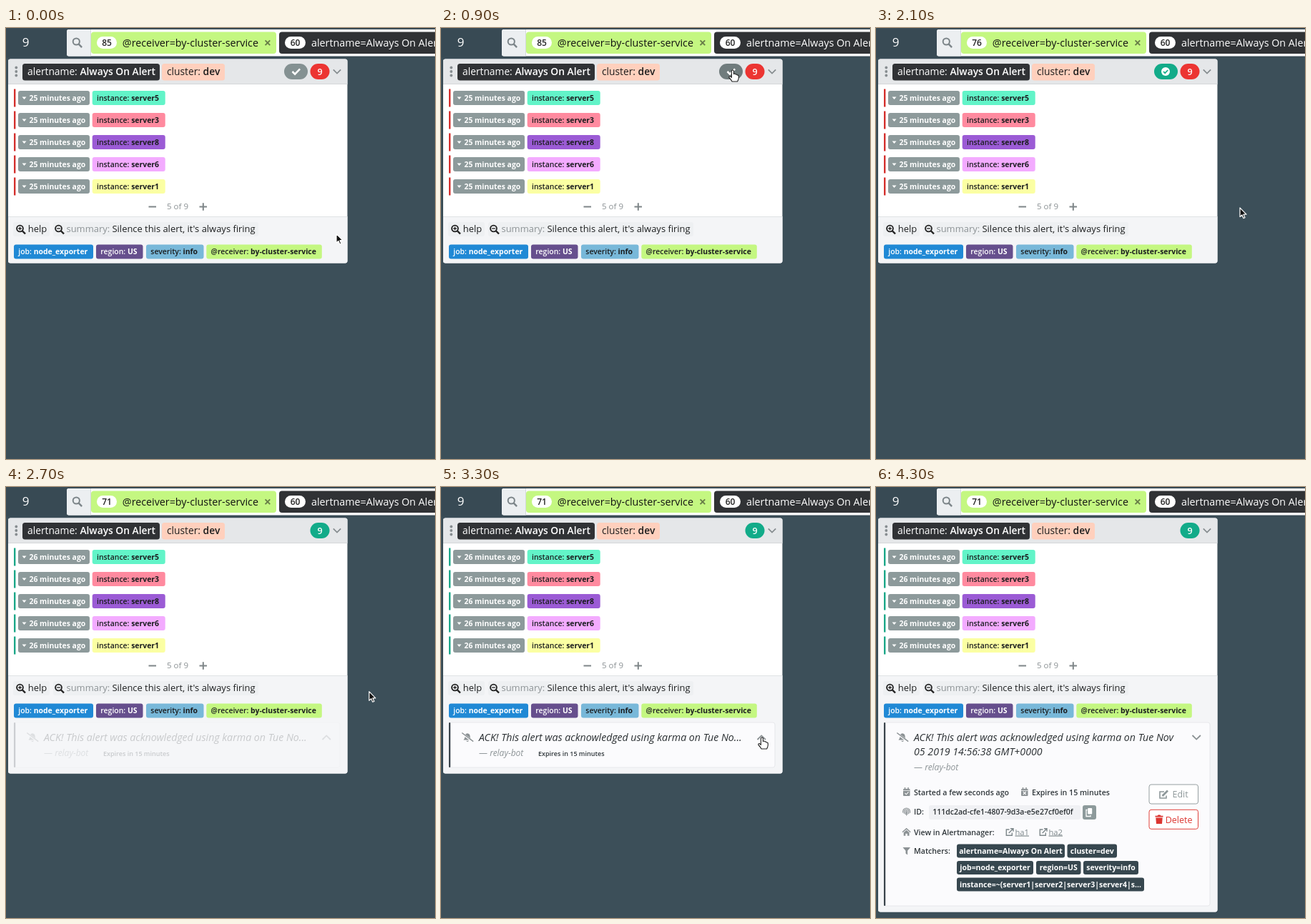
Animation, 600 px wide and 604 px high, one loop 4.4 s. Source, as an HTML page:

```html
<!DOCTYPE html>
<html lang="en">
<head>
<meta charset="utf-8">
<title>Alert acknowledgement</title>
<style>
html, body { margin: 0; width: 100%; height: 100%; overflow: hidden; background: #3c4f59; }
svg { display: block; font-family: "Open Sans", "Noto Sans", sans-serif; }
</style>
</head>
<body>
<svg id="stage" width="600" height="604" viewBox="0 0 600 604"></svg>
<script>
const LOOP = 4400, STEP = 100;
const GREEN = '#12ab89', RED = '#ec3532', GREY = '#8d9a9b', SLATE = '#37474f', LIME = '#c4f781';

const rect = (x, y, w, h, r, fill, extra = '') =>
  `<rect x="${x}" y="${y}" width="${w}" height="${h}" rx="${r}" fill="${fill}" ${extra}/>`;
const text = (x, y, s, size, fill, weight = 400, extra = '') =>
  `<text x="${x}" y="${y}" font-size="${size}" fill="${fill}" font-weight="${weight}" ${extra}>${s}</text>`;
const mid = (x, y, s, size, fill, weight) => text(x, y, s, size, fill, weight, 'text-anchor="middle"');
const line = (d, color, width = 2, extra = '') =>
  `<path d="${d}" fill="none" stroke="${color}" stroke-width="${width}" ${extra}/>`;
const shape = (d, fill) => `<path d="${d}" fill="${fill}"/>`;
const group = (s, opacity) => opacity > 0 ? `<g opacity="${opacity}">${s}</g>` : '';

// Piecewise linear value through [time, ...values] points
function track(points, t) {
  const i = points.findIndex(p => p[0] > t);
  if (i < 0) return points[points.length - 1].slice(1);
  if (i === 0) return points[0].slice(1);
  const a = points[i - 1], b = points[i], k = (t - a[0]) / (b[0] - a[0]);
  return a.slice(1).map((v, n) => v + (b[n + 1] - v) * k);
}

function label(x, y, w, fill, key, value, color = '#1b1d1f') {
  return rect(x, y, w, 20, 3, fill) +
    text(x + 6.3, y + 13.8, `${key}: <tspan font-weight="700">${value}</tspan>`, 10.45, color, 600);
}

function titleLabel(x, w, fill, key, value, color) {
  return rect(x, 50, w, 23.5, 3.5, fill) +
    text(x + 7, 66, `${key}: <tspan font-weight="550">${value}</tspan>`, 13.8, color);
}

function zoom(x, y, plus) {
  return `<circle cx="${x}" cy="${y}" r="4.4" fill="none" stroke="#222" stroke-width="1.9"/>` +
    line(`M${x + 3} ${y + 3}l4.5 4.5`, '#222', 2.4) +
    line(`M${x - 2.3} ${y}h4.6${plus ? 'M' + x + ' ' + (y - 2.3) + 'v4.6' : ''}`, '#222', 1.3);
}

function spinner(x, y, r, width, t, color) {
  const arc = 2 * Math.PI * r;
  return `<circle cx="${x}" cy="${y}" r="${r}" fill="none" stroke="${color}" stroke-width="${width}"
    stroke-dasharray="${arc * .9} ${arc * .1}" transform="rotate(${t * .36 - 576} ${x} ${y}) rotate(-72 ${x} ${y})"/>`;
}

function navbar(t) {
  const count = t < 1600 ? 85 : t < 2700 ? 76 : 71;
  const busy = t >= 1400 && t < 1600 || t >= 2500 && t < 2700;
  return rect(0, 0, 600, 41.5, 0, '#384a54') +
    text(22.7, 26, '9', 17, '#fff') +
    (busy ? spinner(61, 19.5, 10.5, 2.4, t, '#84939a') : '') +
    rect(85, 2, 530, 37.5, 3, '#fff') +
    shape('M88 2H118V39.5H88Q85 39.5 85 36.5V5Q85 2 88 2', '#eceff1') +
    line('M118.5 2V39.5', '#d3d8db', 1) +
    '<circle cx="98.3" cy="19" r="4.6" fill="none" stroke="#7c8589" stroke-width="2"/>' +
    line('M101.5 22.3l4.6 4.8', '#7c8589', 2.4) +
    rect(119, 5.5, 259, 30.5, 4, LIME) +
    rect(127, 12, 28, 17, 8.5, '#fff') +
    mid(141, 25, count, 12, '#222', 600) +
    text(162.8, 26, '@receiver=by-cluster-service', 14.3, '#111') +
    line('M362.6 17.3l6.6 6.8m0-6.8l-6.6 6.8', '#677c47', 1.9) +
    rect(382, 5.5, 240, 30.5, 4, '#303235') +
    rect(390, 12, 29, 17, 8.5, '#fff') +
    mid(404.5, 25, '60', 12, '#222', 600) +
    text(427, 26, 'alertname=Always On Alert', 14.3, '#fff');
}

function ackButton(t) {
  if (t >= 2700) return '';
  const hover = t >= 700 && t < 1600;
  let icon = line('M400.5 61l3.6 3.6 7-7.2', '#fff', 2.5);
  if (t >= 1400 && t < 1600) icon = spinner(405.5, 61, 5, 2, t, '#c5cccc');
  if (t >= 1600) icon = '<circle cx="405" cy="61" r="6" fill="#fff"/>' + line('M402 61l2.2 2.2 4-4.2', GREEN, 1.7);
  return rect(389, 50, 33, 22, 11, t >= 1600 ? GREEN : hover ? '#707c7d' : '#849192') + icon;
}

function header(t) {
  const acked = t >= 2700;
  return shape('M3 78.5V46Q3 43.5 6 43.5H474.5Q477.5 43.5 477.5 46V78.5Z', '#e5e7e9') +
    line('M3 78.5H477.5', '#d4d7d9', 1) +
    [55.5, 61, 66.5].map(y => `<circle cx="14.3" cy="${y}" r="1.9" fill="#878d90"/>`).join('') +
    titleLabel(23, 192, '#303235', 'alertname', 'Always On Alert', '#fff') +
    titleLabel(218, 88, '#ffd0bd', 'cluster', 'dev', '#1c1c1c') +
    ackButton(t) +
    rect(425.5, 50, 27, 22, 11, acked ? GREEN : RED) +
    mid(439, 65.5, '9', 12.5, '#fff', 600) +
    line('M457.8 58.3l5.2 5.2 5.2-5.2', '#858b8e', 1.7);
}

const SERVERS = [[5, '#62f4c8'], [3, '#ff8a9f'], [8, '#9b5bd5'], [6, '#f3abff'], [1, '#fbffa3']];

function alerts(t) {
  const acked = t >= 2700;
  return SERVERS.map(([n, color], i) => {
    const y = 88 + 31 * i;
    return rect(11, y - 2.5, 2.4, 25, 0, acked ? '#1ba788' : '#d4302d') +
      rect(17, y, 100, 20, 3, GREY) +
      shape(`M22.5 ${y + 8.5}h6l-3 3.4Z`, '#fff') +
      text(32.5, y + 13.8, `${acked ? 26 : 25} minutes ago`, 10.4, '#fff', 700) +
      label(120.7, y, 102, color, 'instance', 'server' + n);
  }).join('') +
    line('M199.5 250.5h10.5M270.5 250.5h10.5M275.8 245.2v10.6', '#7e8588', 2) +
    mid(240, 254.3, '5 of 9', 11.5, '#8b9194');
}

function footer() {
  return rect(10, 272, 51, 20, 3, '#eef0f2') + zoom(19.5, 281, true) +
    text(30.8, 286, 'help', 13, '#1d1f20') +
    rect(66, 272, 287, 20, 3, '#eef0f2') + zoom(73.5, 281, false) +
    text(84.5, 286, 'summary: <tspan fill="#1d1f20">Silence this alert, it\'s always firing</tspan>', 12.95, '#8c9295') +
    label(11, 303.5, 111, '#2089d5', 'job', 'node_exporter', '#fff') +
    label(126, 303.5, 65.5, '#664f8d', 'region', 'US', '#fff') +
    label(196, 303.5, 80.5, '#78b8d9', 'severity', 'info') +
    label(280.3, 303.5, 161.5, LIME, '@receiver', 'by-cluster-service');
}

function matcher(x, y, w, s) {
  return rect(x, y, w, 19, 3, SLATE) + mid(x + w / 2, y + 13.3, s, 10.5, '#fff', 700);
}

function calendar(x, y, tick) {
  return rect(x, y + 1, 9.5, 10, 1, '#8b9194') + line(`M${x + 2.5} ${y - 1}v3m4.5-3v3`, '#8b9194', 1.5) +
    line(tick ? `M${x + 2.3} ${y + 6.8}l2 2 3.2-3.5` : `M${x + 2.8} ${y + 5}l4 4m0-4l-4 4`, '#fff', 1.1) +
    line(`M${x} ${y + 3.4}h9.5`, '#fafafc', .8);
}

function fingerprint(x, y) {
  return [1.4, 3.2, 5].map(r =>
    line(`M${x - r} ${y + 5 - r * .7}V${y}a${r} ${r} 0 0 1 ${2 * r} 0v${5.2 - r * .7}`, '#8b9194', 1.1)).join('') +
    line(`M${x} ${y}v5.6`, '#8b9194', 1.1);
}

function outLink(x, s) {
  return line(`M${x + 5} 480h-4.2v8.3h8v-3.8M${x + 4.2} 485l6-6M${x + 6.5} 478.8h4v4`, '#7e888b', 1.4) +
    text(x + 13, 487.5, s, 11.2, '#7e888b', 400, 'text-decoration="underline"');
}

function details() {
  const note = (x, y, s) => text(x, y, s, 10.6, '#2f363a', 600);
  return calendar(38, 422, true) + note(53, 432, 'Started a few seconds ago') +
    calendar(203, 422, false) + note(218, 432, 'Expires in 15 minutes') +
    fingerprint(42.6, 455) +
    note(53, 459, 'ID:') + rect(74, 446, 212, 20, 3, '#f0f1f4') +
    text(79.3, 459, '111dc2ad-cfe1-4807-9d3a-e5e27cf0ef0f', 10.5, '#2a3033', 600) +
    rect(289, 446, 19, 20, 3, GREY) +
    line('M295.5 452.5h-1.5v9h6v-1.5', '#fff', 1.3) + rect(296.2, 450, 6, 8.5, 1, '#fff') +
    line('M37 483.8l5.6-5 5.6 5', '#8b9194', 1.5) +
    shape('M38.7 484.2l3.9-3.4 3.9 3.4v4.6h-2.6v-3h-2.6v3h-2.6Z', '#8b9194') +
    note(53, 487.5, 'View in Alertmanager:') + outLink(181.5, 'ha1') + outLink(228.5, 'ha2') +
    shape('M37.5 505h10.5l-3.9 4.7v5.8l-2.6-2v-3.8Z', '#8b9194') +
    note(53, 514, 'Matchers:') +
    matcher(113, 500.5, 151, 'alertname=Always On Alert') +
    matcher(267.5, 500.5, 69.5, 'cluster=dev') +
    matcher(113, 524, 107, 'job=node_exporter') +
    matcher(224, 524, 62.5, 'region=US') +
    matcher(290, 524, 77, 'severity=info') +
    matcher(113, 547.5, 262, 'instance=~(server1|server2|server3|server4|s...') +
    rect(382, 417, 68.5, 27, 3, '#fff', 'stroke="#969fa1"') +
    line('M403 427h-6v9h9v-3.5', '#8d9799', 1.6) + line('M400.5 433l7.5-7.5', '#8d9799', 2.6) +
    text(414.5, 435.3, 'Edit', 12.5, '#8d9799') +
    rect(382, 452.3, 68.5, 27, 3, '#fff', 'stroke="#e0403a"') +
    shape('M390.5 460.8h3l1-1.2h3l1 1.2h3v1.6h-11ZM391.3 463.4h9.4l-.7 8.6h-8Z', '#dc3530') +
    text(404.7, 470.5, 'Delete', 12.5, '#dc3530');
}

function silence(t, open) {
  const height = open ? 257 : 63;
  const italic = (x, y, s) => text(x, y, s, 14.2, '#2b3033', 400, 'font-style="italic"');
  return rect(11, 330, 456, height, 3, '#fbfbfd', 'stroke="#e2e4e8" stroke-width=".8"') +
    rect(11, 330, 2.2, height, 1, '#3a444b') +
    shape('M31.5 354.5q2-1.6 2-5 0-3.7 3.4-4.2 3.6.4 3.7 4.2 0 3.4 2 5ZM35.2 355.7h3.8q-1.9 2.6-3.8 0', '#8b9194') +
    line('M29.3 345.3L45.2 357', '#fbfbfd', 3) + line('M29.3 344.5L45.2 356.6', '#8b9194', 1.5) +
    italic(53, 355.5, 'ACK! This alert was acknowledged using karma on Tue No' + (open ? 'v' : '...')) +
    (open ? italic(53, 375.5, '05 2019 14:56:38 GMT+0000') : '') +
    text(53, open ? 397.3 : 377.3, '— <tspan font-style="italic">relay-bot</tspan>', 12, '#8d9497') +
    (open ? details() : text(136, 377, 'Expires in 15 minutes', 9, '#2f363a', 600)) +
    line(open ? 'M442.5 348l5.7 5.6 5.7-5.6' : 'M442.5 354l5.7-5.6 5.7 5.6', '#8b9194', 1.8);
}

function card(t) {
  const open = t >= 3400;
  const bottom = t < 2700 ? 329.5 : open ? 595.5 : 401.5;
  return rect(2.5, 43, 475.5, bottom - 42.5, 4, '#2f3f48', 'opacity=".55"') +
    rect(3, 43.5, 474.5, bottom - 43.5, 3.5, '#fff') +
    shape(`M3 264.5H477.5V${bottom - 3}q0 3-3 3H6q-3 0-3-3Z`, '#f4f5f7') +
    line('M3 264.5H477.5', '#e0e2e4', 1) +
    header(t) + alerts(t) + footer() +
    (t >= 2700 ? group(silence(t, open), track([[2600, 0], [2800, .42], [3000, 1]], t)[0]) : '');
}

function tooltip(t) {
  const [fade] = track([[1200, 0], [1400, .74], [1500, .92], [1700, .92], [1900, 0]], t);
  return group(rect(276, 16.5, 261, 23.5, 3.5, '#111') + shape('M401 40h10l-5 5Z', '#111') +
    text(283, 32.2, 'Acknowlage this alert with a short lived silence', 11.5, '#fff'), fade);
}

const PATH = [
  [0, 462, 288.5], [100, 462, 288], [300, 446, 208], [500, 416, 100], [700, 408, 60], [1700, 408, 60],
  [1900, 478, 170], [2100, 509, 252], [2400, 512, 272], [2800, 506.5, 291.5], [3000, 475, 325],
  [3200, 449, 352], [3400, 449, 352], [3700, 512.5, 350.5], [4000, 517, 356], [4200, 604, 380]
];

function cursor(t) {
  if (t >= 4200) return '';
  const [x, y] = track(PATH, t);
  const hand = t >= 700 && t <= 1700 || t >= 3200 && t <= 3400;
  const d = hand
    ? 'M-1.6 0Q0-2 1.4 0V4.5Q3.2 3.3 4.1 5 5.6 4.4 6.3 6 8.2 5.6 8.3 7.8V10Q8 12.5 6.6 15H-.9Q-2.6 12-5 9.5-5.6 7.4-3.4 7.6L-1.6 9.4Z'
    : 'M0 0V12.6L2.9 10 4.9 14.6 7 13.7 5 9.2H9Z';
  return `<path transform="translate(${x} ${y})" d="${d}" stroke-linejoin="round" ` +
    (hand ? 'fill="#fff" stroke="#222" stroke-width="1.1"/>' : 'fill="#111" stroke="#fff" stroke-width="1.2"/>');
}

const stage = document.getElementById('stage');
let shown = -1;

function frame() {
  const t = Math.floor(performance.now() % LOOP / STEP) * STEP;
  if (t !== shown) {
    shown = t;
    stage.innerHTML = rect(0, 0, 600, 604, 0, '#3c4f59') + navbar(t) + card(t) + tooltip(t) + cursor(t);
  }
  requestAnimationFrame(frame);
}
frame();
</script>
</body>
</html>
```
